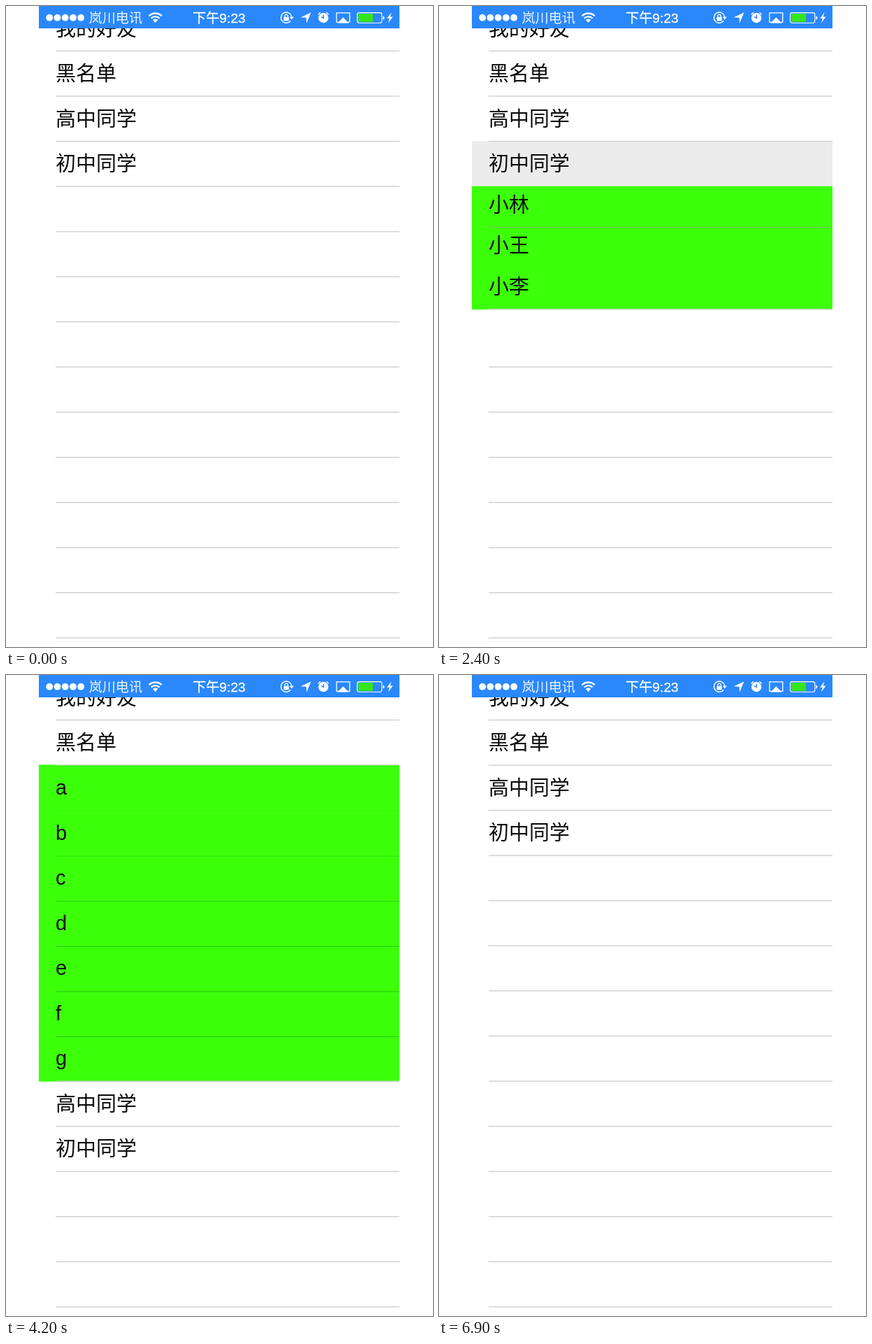
Write an HTML page that moves like this. It is 611 px wide and 917 px high and loops after 7200 ms.

```html
<!DOCTYPE html>
<html lang="zh-CN">
<head>
<meta charset="utf-8">
<title>Grouped list</title>
<style>
html, body { margin: 0; width: 100%; height: 100%; overflow: hidden; background: #fff; }
svg { display: block; width: 100vw; height: 100vh; }
text { font-family: "Liberation Sans", "Noto Sans CJK SC", "Noto Sans CJK", sans-serif; white-space: pre; }
#list text { font-size: 29px; fill: #0b0b0b; }
#bar text { font-size: 19.2px; fill: #fff; }
#bar .carrier { font-weight: 300; opacity: .9; }
</style>
</head>
<body>
<svg viewBox="0 0 611 917">
  <g id="list"></g>
  <g id="bar" fill="#fff">
    <rect x="47" width="516" height="32" fill="#2a88fb"/>
    <g id="dots"></g>
    <text class="carrier" x="118.5" y="23.6">岚川电讯</text>
    <g fill="none" stroke="#fff" stroke-width="2.3">
      <path d="M204.6 14.2a13 13 0 0 1 18.2 0M207.8 17.6a8.4 8.4 0 0 1 11.8 0"/>
    </g>
    <path d="M213.7 24l-3.6-4a5.2 5.2 0 0 1 7.2 0z"/>
    <text x="267" y="23.6" stroke="#fff" stroke-width=".3">下午9:23</text>

    <path d="M407.2 21.2A7.6 7.6 0 1 1 408.6 15.5" fill="none" stroke="#fff" stroke-width="1.4"/>
    <path d="M405.8 15.4h6l-3 4z"/>
    <rect x="397.4" y="15.8" width="7.4" height="5.4" rx=".6"/>
    <path d="M399 16v-1.8a2.1 2.1 0 0 1 4.2 0v1.8" fill="none" stroke="#fff" stroke-width="1.3"/>

    <path d="M436.5 9.2L430.2 24.4l-.6-7.6-7.8-.5z"/>

    <circle cx="454.2" cy="17" r="7.2"/>
    <path d="M446.9 12.4a9 9 0 0 1 3-3M458.5 9.4a9 9 0 0 1 3 3" fill="none" stroke="#fff" stroke-width="1.5"/>
    <path d="M454.4 12.4v5l-3.2-2" fill="none" stroke="#2a88fb" stroke-width="1.4"/>

    <path d="M476 23.2h-3V9.8h18.8v13.4h-3" fill="none" stroke="#fff" stroke-width="1.3"/>
    <path d="M482.4 16.2l8 8.4h-16z"/>

    <rect x="502.6" y="9.6" width="35.2" height="14.6" rx="2.6" fill="none" stroke="#fff" stroke-width="1.1"/>
    <rect x="504" y="11" width="21" height="11.8" rx="1" fill="#35e51c"/>
    <path d="M539.4 14.4q2.2.4 2.2 2.5t-2.2 2.5z"/>
    <path d="M551.4 9.2l-6.2 8.6h3.6l-2 6.8 6.8-9h-3.8z"/>
  </g>
</svg>
<script>
const LOOP = 7200, STEP = 300;
const LEFT = 47, INSET = 71, RIGHT = 563, TOP = 63.8, ROW = 64.58;
const GREEN = '#3cff0a', LINE = '#cacacb';

const groups = [
  { title: '我的好友', items: [] },
  { title: '黑名单', items: [...'abcdefg'] },
  { title: '高中同学', items: ['张三', '李四', '王五', '小明'] },
  { title: '初中同学', items: ['小林', '小王', '小李'] }
];

// Each entry holds until the next: group opened, share unfolded, row highlight.
const timeline = [
  { at: 0 },
  { at: 1200, open: 2, part: 1 },
  { at: 1800 },
  { at: 2100, open: 3, part: 0.753, tint: '#d9d9d9' },
  { at: 2400, open: 3, part: 0.906, tint: '#ececec' },
  { at: 2700, open: 3, part: 1 },
  { at: 3000, open: 3, part: 0.978, tint: '#d9d9d9', closing: true },
  { at: 3300 },
  { at: 3900, open: 1, part: 1 },
  { at: 4500 }
];

const list = document.getElementById('list');
const lineY = i => TOP + ROW * i;

const rect = (x, y, w, h, fill, opacity = 1) =>
  `<rect x="${x}" y="${y}" width="${w}" height="${h}" fill="${fill}" opacity="${opacity}"/>`;
const rule = (y, color = LINE, opacity = 1) => rect(INSET, y, RIGHT - INSET, 1.25, color, opacity);
const label = (bottom, s) =>
  `<text x="${INSET}" y="${bottom - ROW / 2 + (s.length > 1 ? 11 : 10.3)}">${s}</text>`;

function drawItems(items, top, part) {
  const pitch = ROW * part;
  const bottom = top + items.length * pitch;
  let body = '', rules = '';
  items.forEach((s, i) => {
    const y = top + (i + 1) * pitch;
    body += label(y, s);
    if (i === items.length - 1) return;
    if (part === 1) rules += rule(y + 1, '#2ac80a', Math.min(0.85, Math.max(0.1, (y - 180) / 210)));
    else if (i === 0) rules += rule(y, '#86b878', 0.8);
  });
  return rect(LEFT, top, RIGHT - LEFT, bottom - top + 1.2, GREEN) + rules + body + rule(bottom);
}

function drawList({ open = -1, part = 0, tint, closing }) {
  const items = open < 0 ? [] : groups[open].items;
  let lines = '', panel = '', heads = '';
  groups.forEach((g, i) => {
    heads += label(lineY(i > open ? i + items.length : i), g.title);
  });
  for (let i = 0; i < 14; i++) {
    const hidden = items.length && i >= open && i <= open + items.length;
    if (!hidden || closing) lines += rule(lineY(i));
  }
  if (items.length) {
    panel = drawItems(items, lineY(open), part);
    panel += tint
      ? rect(LEFT, lineY(open - 1) + 0.4, RIGHT - LEFT, ROW - 0.4, tint) + rule(lineY(open - 1))
      : rule(lineY(open) - 0.4, '#c9dcc4');
  }
  return lines + panel + heads;
}

document.getElementById('dots').innerHTML = Array.from({ length: 5 }, (_, i) =>
  `<circle cx="${62.2 + i * 11.25}" cy="16.7" r="4.9"/>`).join('');

let shown = null;
function render(ms) {
  const t = Math.floor((ms % LOOP) / STEP) * STEP;
  const state = timeline.filter(s => s.at <= t).pop();
  if (state !== shown) list.innerHTML = drawList(shown = state);
}

const start = performance.now();
function tick() {
  render(performance.now() - start);
  requestAnimationFrame(tick);
}
tick();
</script>
</body>
</html>
```
